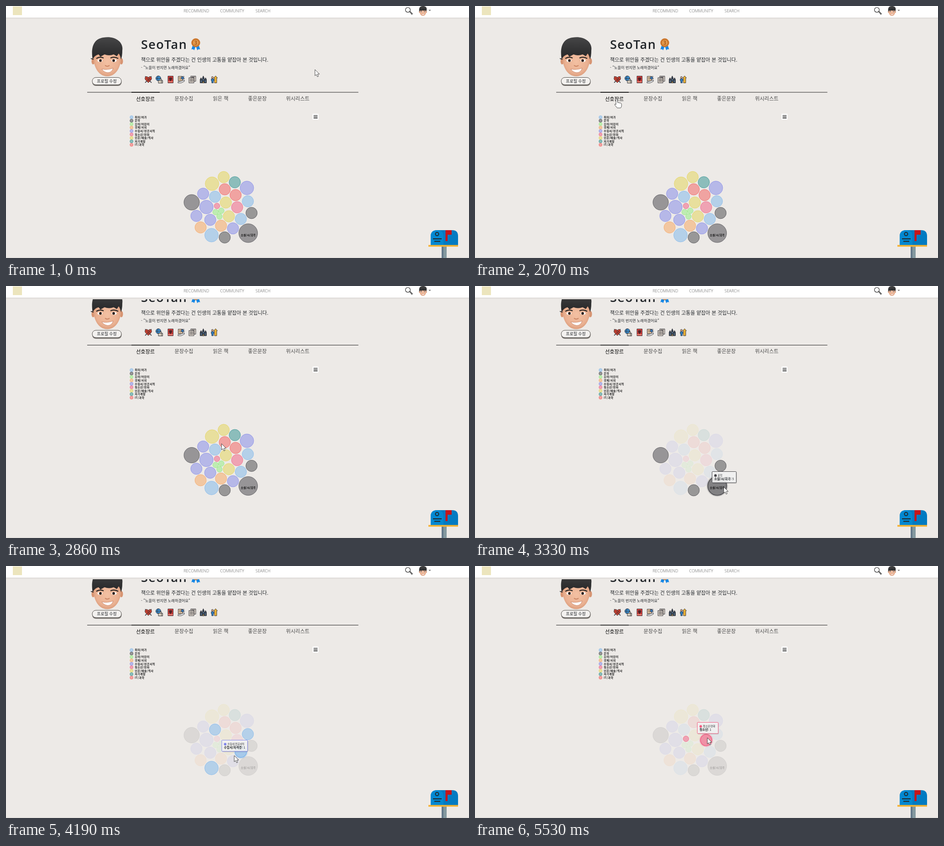
These frames come from a looping animation (1015 px wide and 552 px high, 5.6 s). An HTML page:

```html
<!DOCTYPE html>
<html lang="ko">
<head>
<meta charset="utf-8">
<title>Profile</title>
<style>
html, body { margin: 0; width: 100%; height: 100%; overflow: hidden; background: #edeae7; }
svg { display: block; width: 1015px; height: 552px; }
text { font-family: "Noto Sans CJK KR", "Noto Sans CJK", sans-serif; fill: #212529; }
.nav text { font: 300 9px "Open Sans", sans-serif; fill: #555; }
.name { font: 600 27px "Open Sans", sans-serif; letter-spacing: 1.4px; }
.tabs text { font-size: 11.2px; font-weight: 300; text-anchor: middle; fill: #484848; }
.tabs .on { font-weight: 400; fill: #000; }
.legend text { font-size: 6.1px; font-weight: 700; letter-spacing: .35px; fill: #222; }
.mid { text-anchor: middle; }
.line { fill: none; stroke: #222; }
.badges { stroke: #2b2b33; stroke-width: .9; stroke-linejoin: round; }
</style>
</head>
<body>
<svg viewBox="0 0 1015 552">
  <defs>
    <radialGradient id="skin" cx=".5" cy=".5" r=".6">
      <stop offset="0" stop-color="#f3c0a2"/><stop offset=".65" stop-color="#eab192"/><stop offset="1" stop-color="#cf8d6b"/>
    </radialGradient>
    <linearGradient id="hair" x2="0" y2="1">
      <stop offset="0" stop-color="#464647"/><stop offset="1" stop-color="#252526"/>
    </linearGradient>
    <linearGradient id="shade" x2="0" y2="1">
      <stop offset="0" stop-color="#d4d1ce"/><stop offset="1" stop-color="#edeae7"/>
    </linearGradient>
    <g id="face">
      <ellipse cx="191" cy="121" rx="3.500" ry="7" fill="#d79472"/>
      <ellipse cx="253" cy="121" rx="3.500" ry="7" fill="#d79472"/>
      <path d="M191 104C190 128 200 154 222 154S254 128 253 104C248 85 196 85 191 104Z" fill="url(#skin)"/>
      <path d="M190 117C186 94 190 72 214 69C238 65 258 78 255 97Q255 110 252 117Q251 109 247 104L243 110L236 106Q226 110 216 106L207 111L203 106Q194 108 190 117Z" fill="url(#hair)"/>
      <path d="M198 115Q206 110 214 114M229 114Q237 110 246 115" fill="none" stroke="#2a2522" stroke-width="2.200"/>
      <ellipse cx="206" cy="119.500" rx="5.500" ry="3.200" fill="#fff"/>
      <ellipse cx="237" cy="119.500" rx="5.500" ry="3.200" fill="#fff"/>
      <circle cx="207" cy="119.500" r="2.900" fill="#31231d"/>
      <circle cx="236" cy="119.500" r="2.900" fill="#31231d"/>
      <path d="M217 130Q222 134 227 130" fill="none" stroke="#c98564" stroke-width="1.800"/>
      <path d="M210 138Q222 141 235 136Q232 146 223 146Q214 145 210 138Z" fill="#fff" stroke="#c07a60" stroke-width=".8"/>
      <path d="M186 115L192 117" stroke="#222" stroke-width="1.500"/>
    </g>
  </defs>
  <rect width="1015" height="552" fill="#edeae7"/>

  <g id="page">
    <use href="#face"/>
    <rect x="189" y="158.500" width="64.500" height="16.500" rx="8" fill="#77736f"/>
    <rect x="189" y="156.500" width="64" height="16" rx="8" fill="#f3f1ef" stroke="#55524f"/>
    <text class="mid" x="221" y="167.500" font-size="8.900">프로필 수정</text>

    <text class="name" x="296" y="94">SeoTan</text>
    <path d="M409 87L406.500 95L410 94.500L412.500 97L415.500 89ZM423 87L425.500 95L422 94.500L419.500 97L416.500 89Z" fill="#1687e5"/>
    <circle cx="416" cy="80.500" r="9.700" fill="#cf7a30"/>
    <circle cx="416" cy="80.500" r="7" fill="#e39a4c" stroke="#b9651f"/>
    <text class="mid" x="416" y="84.500" font-size="11" font-weight="700" style="fill:#a85a1b">3</text>
    <text x="296" y="122" font-size="10.950">책으로 위안을 주겠다는 건 인생의 고통을 얕잡아 본 것입니다.</text>
    <text x="296" y="138" font-size="8.200">- "노을이 번지면 노래하겠어요"</text>

    <g class="badges">
      <g fill="#c8402f">
        <path d="M305 154L319 168M319 154L305 168" stroke-width="1.500"/>
        <path d="M312 157C316 151 322 157 318 162L312 168L306 162C302 157 308 151 312 157Z"/>
        <path d="M308 158L315 165M311 157L317 162M316 158L309 165" fill="none"/>
      </g>
      <circle cx="334" cy="158.500" r="5.500" fill="#3b8fd0"/>
      <path d="M329 158.500H339M334 153Q330 158 334 164" fill="none"/>
      <path d="M334 163H343.500V169H334ZM337 160H341V169" fill="#d6cdbc"/>
      <path d="M355 153.500H366.500V168.500H355Z" fill="#d43d3a"/>
      <path d="M355 166H366" stroke="#f3dcc0"/>
      <path d="M358 157H363.500V160Q363 163 360.700 164Q358 163 358 160Z" fill="#5b1f22"/>
      <path d="M377.500 154H387V164H377.500Z" fill="#e7c9a3"/>
      <path d="M377 166L384 164.500L391 162V165L384 168.500H377Z" fill="#eee"/>
      <circle cx="387" cy="157.500" r="3" fill="#3b78b5"/>
      <path d="M379.500 157H383M379.500 160H384M389 153L391 155M390 160L392 158" fill="none"/>
      <path d="M401 157H412V168.500H401ZM405 153.500H416V165H412V157H405Z" fill="#d8cfc5"/>
      <path d="M403 160H410M403 162.500H410M403 165H410M407 155.500H414" fill="none"/>
      <path d="M425.500 168.500V161L427.500 157L429.500 161H430.500V158L432.500 153L434.500 158V161H435.500L437.500 157L439.500 161V168.500Z" fill="#34404f"/>
      <path d="M428 163V167M437 163V167M432.500 160V163" stroke="#8bb6d8"/>
      <path d="M431 168.500V165.500H434V168.500Z" fill="#e0b45a"/>
      <circle cx="452.500" cy="156.500" r="2" fill="#e9b28d"/>
      <path d="M450 159.500H455.500V164H454.500V168.500H451V164H450Z" fill="#2c7fc4"/>
      <path d="M457 168.500V157.500H455.500L459.500 153L463.500 157.500H462V168.500Z" fill="#f0b432"/>
    </g>

    <path d="M178 189H772.500" stroke="#222"/>
    <path d="M275 189H337" stroke="#000" stroke-width="1.600"/>
    <g class="tabs">
      <text class="on" x="305.500" y="207.500">선호장르</text>
      <text x="390" y="206.500">문장수집</text>
      <text x="470.500" y="206.500">읽은 책</text>
      <text x="551" y="206.500">좋은문장</text>
      <text x="639.500" y="206.500">위시리스트</text>
    </g>
    <rect x="672" y="236" width="13" height="13" fill="#fff"/>
    <path d="M674.300 239.800H683M674.300 242.700H683M674.300 245.600H683" stroke="#444" stroke-width="1.600"/>
    <g class="legend" id="legend"></g>
    <g id="bubbles"></g>
    <text class="mid" id="label" font-size="6" font-weight="700" style="fill:#111">소설/시/희곡</text>
  </g>

  <rect y="551" width="1015" height="1" fill="#d9d6d3"/>
  <rect y="25" width="1015" height="4" fill="url(#shade)"/>
  <rect width="1015" height="25.500" fill="#fff"/>
  <rect x="15" y="1" width="20" height="19" fill="#ece5bd"/>
  <g class="nav">
    <text x="389.500" y="14">RECOMMEND</text>
    <text x="469.500" y="14">COMMUNITY</text>
    <text x="547" y="14">SEARCH</text>
  </g>
  <circle class="line" cx="881" cy="8.500" r="5.300" stroke-width="1.100"/>
  <path d="M884.800 12.600L886 11.500L891.500 17L889.700 18.800Z" fill="#777" stroke="#222" stroke-width=".8"/>
  <use href="#face" transform="translate(858.500 -17) scale(.25)"/>
  <path d="M926.500 8.500H931.500L929 11Z" fill="#555"/>

  <rect x="955" y="526" width="11" height="26" fill="#84999f"/>
  <rect x="955" y="526" width="4" height="26" fill="#64798a"/>
  <path d="M931 524V505Q931 491 945 491H978Q991 491 991 504V524Z" fill="#027bc2"/>
  <path d="M931 524V505Q931 491 945 491Q959 491 959 505V524Z" fill="#0288d1"/>
  <rect x="926" y="523.500" width="65" height="3.700" fill="#f5b233"/>
  <path d="M963.500 491H977V501H968V515H963.500Z" fill="#c4161c"/>
  <circle class="line" cx="945" cy="499.500" r="3.600" stroke-width="1.800"/>
  <path class="line" d="M936 510H955M939 515.500H952" stroke-width="1.800"/>

  <g id="tip">
    <rect id="tipShadow" x="1" y="1.500" height="24.500" rx="1.500" fill="#000" opacity=".18"/>
    <rect id="tipBox" height="24.500" rx="1.500" fill="#f7f7f7" fill-opacity=".88"/>
    <circle id="tipDot" cx="7.500" cy="8.700" r="2.800"/>
    <text id="tipGenre" x="12.500" y="10.700" font-size="5.400"></text>
    <text id="tipItem" x="4.800" y="18.700" font-size="6.600"><tspan id="tipKey" font-weight="700"></tspan><tspan> 1</tspan></text>
  </g>
  <g fill="#fff" stroke="#222" stroke-width=".8" stroke-linejoin="round">
    <path id="arrow" d="M.3 .3V13.800L3.400 11L5.600 16L8 14.900L5.800 10.100H10.200Z"/>
    <path id="hand" d="M-2.300 1.800a1.800 1.800 0 0 1 3.600 0V8L8 9.300q2 .5 2 3v2.700q0 2.800-2 5H.5L-4.500 14q-1.200-2 .2-2.700l2 1.300Z"/>
  </g>
</svg>
<script>
const LOOP = 5600, SCROLL = 59.5, SCROLL_AT = 2680, WAKE = 2945, LAG = 60;
const GAP = 1.9, CENTER = { x: 466, y: 450 };
const $ = id => document.getElementById(id);
// name, colour, item named in the tooltip
const genres = [
  ["취미/여가", "#7cb5ec", "여행"], ["문학", "#434348", "소설/시/희곡"], ["유아/어린이", "#90ed7d", "동화"],
  ["경제/사회", "#f7a35c", "경제"], ["수험서/전공서적", "#8085e9", "수험서/자격증"], ["청소년/만화", "#f15c80", "청소년"],
  ["인문/예술/역사", "#e4d354", "역사"], ["자기계발", "#2b908f", "계발"], ["IT/과학", "#f45b5b", "컴퓨터"]
];
// time, x, y
const path = [
  [120, 677, 139], [680, 444, 176], [1060, 387, 170], [1300, 343, 166], [1450, 386, 161],
  [1750, 295, 168], [2070, 311, 203], [2560, 471, 346], [2860, 472, 345], [3330, 545, 440],
  [3870, 526, 421], [4100, 516, 406], [4190, 500, 415], [4500, 495, 417], [4600, 491, 408],
  [5150, 491, 393], [5530, 509, 376]
];

function add(parent, tag, attrs, text) {
  const el = document.createElementNS("http://www.w3.org/2000/svg", tag);
  for (const k in attrs) el.setAttribute(k, attrs[k]);
  if (text) el.textContent = text;
  return parent.appendChild(el);
}
const set = (id, k, v) => $(id).setAttribute(k, v);
const move = (id, x, y) => set(id, "transform", `translate(${x} ${y})`);
const show = (id, on) => set(id, "visibility", on ? "visible" : "hidden");
const dist = (a, b) => Math.hypot(a.x - b.x, a.y - b.y);

// Packing: four small bubbles in the middle, the rest roll around them.
const bubbles = [[462.5, 438, 5], [472, 448.5, 2], [468, 461, 2], [459.5, 451.5, 2]]
  .map(([x, y, genre]) => ({ x, y, r: 6.2, genre, value: 0 }));

// Both places where a circle of radius r touches a and b.
function touching(a, b, r) {
  const ra = a.r + r + GAP, rb = b.r + r + GAP, d = dist(a, b);
  if (d > ra + rb || d < Math.abs(ra - rb)) return [];
  const along = (ra * ra - rb * rb + d * d) / (2 * d);
  const off = Math.sqrt(Math.max(0, ra * ra - along * along));
  const ux = (b.x - a.x) / d, uy = (b.y - a.y) / d;
  return [off, -off].map(h => ({ x: a.x + ux * along - uy * h, y: a.y + uy * along + ux * h, r }));
}
function turn(from, to) {
  const angle = p => Math.atan2(p.y - CENTER.y, p.x - CENTER.x);
  const d = angle(to) - angle(from);
  return Math.atan2(Math.sin(d), Math.cos(d));
}
// Each bubble touches the one before it, as far round as there is room.
function roll(prev, dir, genreList, values) {
  [...genreList].forEach((g, i) => {
    const value = +values[i], r = Math.sqrt(89 + 67 * value);
    const spots = bubbles.filter(b => b !== prev)
      .flatMap(b => touching(prev, b, r))
      .filter(s => bubbles.every(b => dist(s, b) > s.r + b.r + GAP - .05))
      .sort((a, b) => dir * (turn(prev, b) - turn(prev, a)));
    prev = { ...spots[0], genre: +g, value };
    bubbles.push(prev);
  });
}
roll(bubbles[1], 1, "6344065041034146", "1112111111211312");
roll(bubbles[10], -1, "886", "111");
roll(bubbles[22], 1, "7401", "1211");
roll(bubbles[11], 1, "1", "5");

genres.forEach(([name, color], i) => {
  const y = 243.7 + i * 7.53;
  add($("legend"), "circle", { cx: 275.2, cy: y, r: 3.5, fill: color, "fill-opacity": .5, stroke: color, "stroke-width": .7 });
  add($("legend"), "text", { x: 282.2, y: y + 2.2 }, name);
});
const halo = add($("bubbles"), "circle", { "fill-opacity": .25 });
const dots = bubbles.map(({ x, y, r, genre }) =>
  add($("bubbles"), "circle", { cx: x, cy: y, r, fill: genres[genre][1], stroke: genres[genre][1], "fill-opacity": .5 }));
const largest = bubbles[bubbles.length - 1];
set("label", "x", largest.x);
set("label", "y", largest.y + 6);

function cursorAt(t) {
  const i = path.findIndex(p => p[0] > t);
  if (i < 1) return path.at(i).slice(1);
  const a = path[i - 1], b = path[i], k = (t - a[0]) / (b[0] - a[0]);
  return [a[1] + (b[1] - a[1]) * k, a[2] + (b[2] - a[2]) * k];
}
// Bubble nearest to the pointer once it moves over the scrolled chart.
function hoverAt(t) {
  if (t < WAKE) return null;
  const [x, y] = cursorAt(t), p = { x, y: y + SCROLL };
  const edge = b => dist(b, p) - b.r;
  return bubbles.reduce((a, b) => edge(b) < edge(a) ? b : a);
}
function drawBubbles(hover) {
  const lit = genre => !hover || hover.genre === genre;
  dots.forEach((dot, i) => {
    dot.setAttribute("opacity", lit(bubbles[i].genre) ? 1 : .2);
    dot.setAttribute("stroke-width", hover === bubbles[i] ? 1.4 : .7);
  });
  set("label", "opacity", lit(largest.genre) ? 1 : .25);
  halo.setAttribute("r", hover ? hover.r + 2.7 : 0);
  if (hover) {
    halo.setAttribute("cx", hover.x);
    halo.setAttribute("cy", hover.y);
    halo.setAttribute("fill", genres[hover.genre][1]);
  }
}
function drawTip(hover, x, y) {
  show("tip", hover);
  if (!hover) return;
  const [name, color, item] = genres[hover.genre];
  $("tipGenre").textContent = name;
  $("tipKey").textContent = item + ":";
  $("tipKey").nextSibling.textContent = " " + Math.max(1, hover.value);
  const w = Math.max($("tipGenre").getComputedTextLength() + 19, $("tipItem").getComputedTextLength() + 10);
  set("tipBox", "width", w);
  set("tipShadow", "width", w);
  set("tipBox", "stroke", color);
  set("tipDot", "fill", color);
  move("tip", x - w / 2 + 1.3, y - 33.5);
}
function draw(now) {
  const t = now % LOOP;
  const [x, y] = cursorAt(t);
  const k = Math.min(1, Math.max(0, (t - SCROLL_AT) / 150));
  const onTab = t > 1990 && t < 2120;
  move("page", 0, -SCROLL * (1 - (1 - k) ** 2));
  drawBubbles(hoverAt(t - LAG));
  drawTip(hoverAt(t), x, y);
  show("arrow", !onTab);
  show("hand", onTab);
  move("arrow", x, y);
  move("hand", x, y);
}
const start = performance.now();
function tick() {
  draw(performance.now() - start);
  requestAnimationFrame(tick);
}
tick();
</script>
</body>
</html>
```
